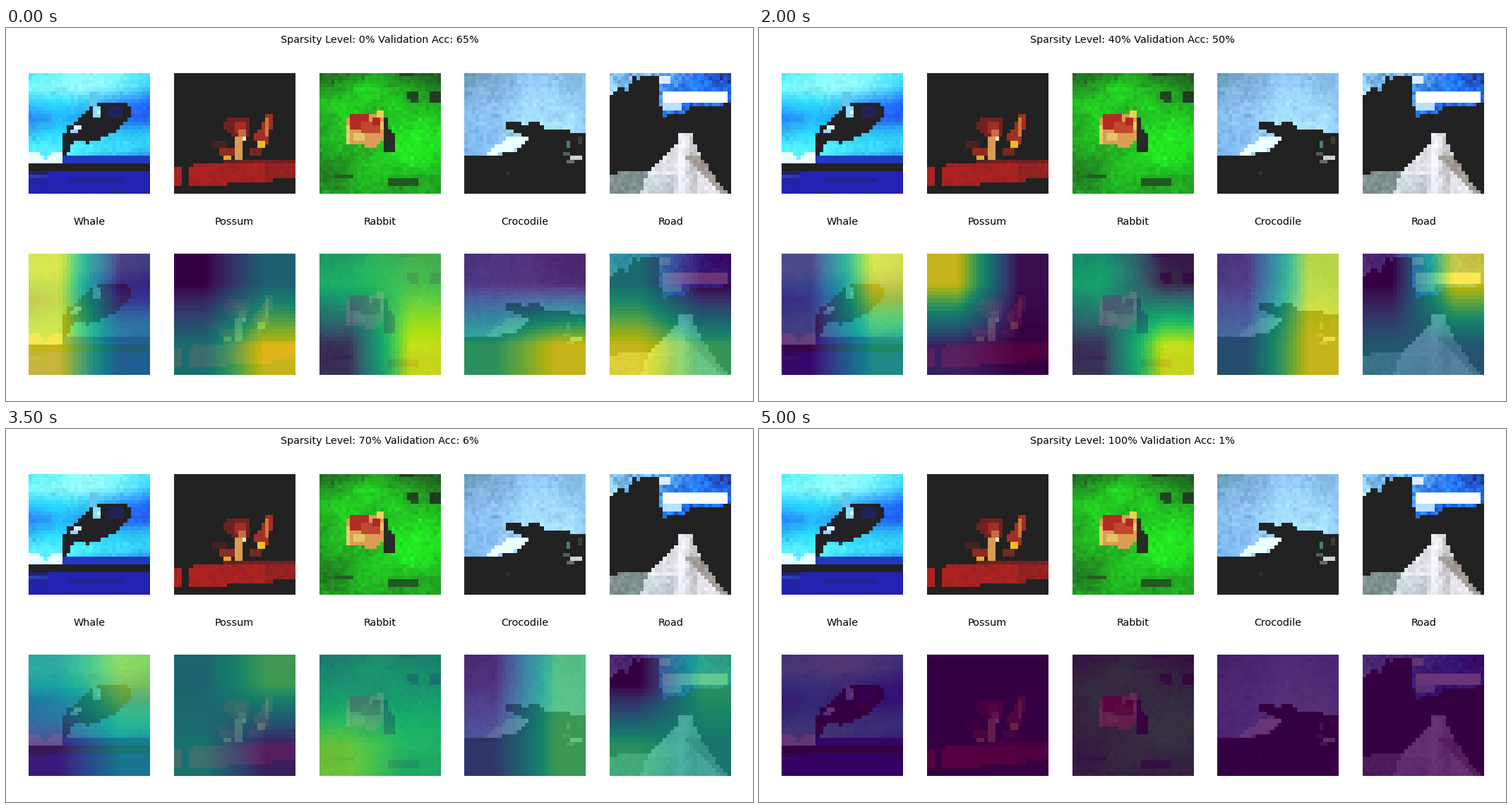
Recreate the animation shown at these times as a matplotlib script. Size 1058 by 529 pixels, loop 5500 ms.

```python
import numpy as np
import matplotlib.pyplot as plt
from matplotlib.animation import FuncAnimation
from matplotlib.colors import to_rgb
from matplotlib.path import Path

WIDTH, HEIGHT, N = 1058, 529, 32
PANEL, PITCH, LEFT = 171.7, 205.82, 32
FLOOR = 34 / 255  # darkest tone shown in the upper row
DARK = "#222222"
ACCURACY = [65, 63, 58, 55, 50, 38, 20, 6, 2, 1, 1]

rng = np.random.default_rng(4)
cols, rows = np.meshgrid(np.arange(N) + 0.5, np.arange(N) + 0.5)
centres = np.column_stack([cols.ravel(), rows.ravel()])


def stretch(grid, edge=0):
    """Bilinear enlargement of a coarse grid to N x N x channels."""
    grid = np.asarray(grid, float)

    def along(values, axis):
        spots = np.linspace(edge, N - edge, values.shape[axis])
        at = np.arange(N) + 0.5
        return np.apply_along_axis(lambda v: np.interp(at, spots, v), axis, values)

    return along(along(grid, 0), 1)


def soft(*lines):
    return stretch([[to_rgb(c) for c in line.split()] for line in lines])


def mottle(img, amount, mask=True):
    grain = rng.normal(0, amount, (N, N, 1)) + stretch(rng.normal(0, amount, (9, 9, 1)))
    img += np.where(np.broadcast_to(mask, (N, N))[..., None], grain * (img > 0.2), 0)


def poly(img, color, *points):
    inside = Path(points).contains_points(centres).reshape(N, N)
    img[inside] = to_rgb(color)
    return inside


def box(img, color, c0, r0, c1, r1):
    img[r0:r1, c0:c1] = to_rgb(color)


def whale():
    img = soft("#58f4ff #70ffff #98ffff #80ffff #48e8ff",
               "#78ffff #90ffff #a0ffff #70f0ff #38c8ff",
               "#30c8ff #28d8ff #40d0f8 #2890ff #2468ff",
               "#2878f0 #24b8ff #28a0f0 #2458f0 #2260f0",
               "#30c0f8 #28d8ff #28d0ff #28c8f8 #2cc0f0",
               "#50f0ff #50f0ff #48f0ff #40e0ff #38d0ff",
               "#70e8ff #60e0ff #30b0ff #2888f8 #2460e8",
               "#2222a0 #2228a8 #2222a8 #2222a0 #2222a0",
               "#2222b0 #2222a8 #2222b0 #2222a8 #2222b0")
    mottle(img, 0.02)
    box(img, "#2238c0", 9, 22, 32, 24)
    box(img, DARK, 0, 24, 32, 26)
    box(img, "#222270", 0, 26, 6, 27)
    box(img, "#2222b4", 5, 26, 32, 31)
    box(img, "#222290", 11, 28, 25, 29)
    poly(img, "#e8ffff", (0, 21), (2, 21), (4, 23), (7, 20.5), (9, 21), (9.5, 24), (0, 24))
    poly(img, "#60c8f0", (16, 5), (17.6, 5.5), (19, 9), (16, 9))
    poly(img, "#222226", (12.4, 13), (16.5, 9), (20, 8), (27.2, 8.6), (27.2, 11.5),
         (25, 14), (21, 16.6), (15.5, 18.6), (12, 18.2), (10, 21.6), (8.6, 21.6),
         (8.6, 17.5), (10.5, 14.5))
    box(img, "#222258", 21, 9, 25, 12)
    box(img, "#8cdcff", 17, 9, 19, 12)
    box(img, "#eaffff", 18, 10, 19, 11)
    box(img, "#e0f4ff", 12, 14, 14, 15)
    box(img, "#a0d0ff", 11, 15, 13, 16)
    return img


def possum():
    img = soft(f"{DARK} {DARK}", f"{DARK} {DARK}")
    red = poly(img, "#aa2222", (0, 25), (10, 24), (16, 23), (32, 23), (32, 28),
               (20, 29), (8, 30), (0, 30))
    img[red & (cols > 24)] = to_rgb("#902222")
    img[red & (rows < 24)] = to_rgb("#702222")
    mottle(img, 0.025, red)
    box(img, DARK, 2, 24, 4, 30)
    box(img, "#482222", 10, 18, 14, 20)
    poly(img, "#702222", (13, 13), (16, 11.5), (19.5, 12), (20, 17), (17, 18), (14, 16))
    box(img, "#a02e24", 16, 13, 19, 16)
    box(img, "#c86a48", 17, 15, 19, 17)
    box(img, "#d89c50", 16, 17, 18, 23)
    box(img, "#f0e4c0", 18, 17, 19, 18)
    box(img, "#8c2c22", 12, 20, 16, 22)
    box(img, "#e8a828", 13, 22, 15, 23)
    poly(img, "#a03024", (24, 11.6), (26, 11), (25, 19), (22, 20.5), (21, 16), (23, 15))
    box(img, "#d07838", 24, 12, 25, 17)
    box(img, "#eebc28", 22, 18, 24, 20)
    box(img, "#702c22", 20, 20, 23, 22)
    return img


def rabbit():
    img = soft("#226022 #227022 #22a022 #229022 #226022 #226022",
               "#229c22 #22b422 #22d422 #22b422 #22a022 #228022",
               "#22b422 #22d822 #22c022 #22c822 #22c022 #22b422",
               "#22a822 #22c822 #22b022 #22d022 #22dc22 #22d022",
               "#229c22 #22c022 #22b822 #22dc22 #22f022 #22dc22",
               "#229022 #22a822 #22c022 #22d822 #22e422 #22c822",
               "#227822 #229022 #22c822 #22c022 #22a822 #22b022",
               "#22a022 #22a022 #22b422 #22a022 #22a822 #22a822")
    mottle(img, 0.035)
    box(img, "#224022", 21, 0, 25, 1)
    box(img, "#224422", 23, 5, 26, 7)
    box(img, "#225022", 24, 7, 26, 8)
    box(img, "#223c22", 29, 5, 32, 8)
    box(img, "#225822", 18, 28, 26, 30)
    box(img, "#226022", 4, 27, 9, 28)
    poly(img, "#262c22", (16, 12), (18, 11.5), (18.5, 15), (20, 16), (20, 21), (17, 21))
    poly(img, "#dc9c54", (7, 14), (8, 11), (10, 10.5), (17, 11), (17, 18), (15, 19.8), (7, 19))
    box(img, "#b42c24", 8, 11, 13, 15)
    box(img, "#c04830", 11, 13, 16, 16)
    box(img, "#b02824", 14, 12, 16, 14)
    box(img, "#e4d060", 7, 14, 8, 19)
    box(img, "#ecd058", 15, 10, 17, 12)
    box(img, "#e0c868", 9, 16, 12, 18)
    box(img, "#e8c860", 16, 13, 17, 15)
    return img


def crocodile():
    img = soft("#6098b0 #78a8d0 #88c0f4 #88c0f0 #80b4dc",
               "#78b0e0 #88bcec #a0dcff #a4dcff #90c8f4",
               "#80b8ec #88c0f4 #a8e0ff #a8e4ff #98d0fc",
               "#80b8f0 #88c4f8 #98d4ff #98d0ff #90c8ff",
               "#88c0f0 #90ccff #a0dcff #88c0f0 #88c0f0")
    mottle(img, 0.025)
    poly(img, "#ecffff", (9, 19), (12, 17), (17, 16.5), (16, 19), (12, 21), (6, 22), (7, 20))
    poly(img, DARK, (10.6, 13), (14, 13), (16, 14), (19, 13), (21, 14.5), (27, 15),
         (28, 16), (32, 16), (32, 32), (0, 32), (0, 21.5), (8, 22), (13, 21), (16, 19),
         (17, 17), (13, 16), (13, 15), (10.6, 14.4))
    box(img, "#488070", 27, 18, 28, 20)
    box(img, "#506050", 26, 21, 28, 22)
    box(img, "#c8d8c8", 28, 22, 31, 23)
    box(img, "#384038", 30, 17, 31, 19)
    box(img, "#607060", 27, 23, 29, 24)
    box(img, "#223a22", 11, 26, 12, 27)
    return img


def road():
    img = soft("#90d0f8 #60a8f0 #70b8f8 #2270f0 #2248a0",
               "#b0e4ff #78c0f8 #2278f8 #2270f0 #2260f0",
               "#80c0f0 #a0d8ff #3080f8 #2278ff #2278ff",
               "#2270f0 #a0d8ff #70b8f8 #2274ff #2274ff",
               "#2270f0 #2270f0 #2270f0 #2270f0 #2270f0")
    mottle(img, 0.07)
    box(img, "#d8f0ff", 13, 1, 16, 3)
    box(img, "#b8e0ff", 14, 8, 19, 10)
    poly(img, DARK, (0, 6), (2, 5), (2, 3.5), (5, 5), (6, 1), (8, 2), (9, 0.8), (12, 0.8),
         (13, 2), (13, 7), (14.5, 11.6), (20, 11), (22, 9), (28, 9), (32, 8), (32, 32), (0, 32))
    box(img, "#ffffff", 14, 5, 31, 8)
    way = poly(img, "#e4e4ec", (18.6, 16), (21.4, 16), (24, 22), (28, 28), (31.5, 32),
               (0, 32), (0, 27), (4, 26), (10, 26), (14, 22.5), (18, 18))
    verge = way & (cols < 10 - (rows - 27) * 0.4)
    img[verge] = to_rgb("#7c8c8c")
    img[way & (cols > 21) & (cols < 23)] = to_rgb("#d0d0d4")
    img[way & (cols > 18) & (cols < 20)] = to_rgb("#f4f4fc")
    img[way & ~verge & (cols < 17) & (rows > 27)] = to_rgb("#ccd4dc")
    img[way & (cols > rows - 2.4) & (rows > 22)] = to_rgb("#a8a09c")
    mottle(img, 0.03, way)
    return img


# Percent heat at top left, top right, bottom left, bottom right
HEAT_STEPS = [0, 1, 2, 4, 6, 8, 10]
COLD = (0, 0, 0, 0)
SCENES = {
    "Whale": (whale, [(100, 5, 100, 40), (50, 5, 90, 100), (12, 100, 40, 0),
                      (8, 100, 3, 63), (100, 70, 0, 20), (6, 100, 17, 84), COLD]),
    "Possum": (possum, [(0, 41, 48, 100), (70, 96, 0, 100), (0, 100, 43, 20),
                        (100, 5, 12, 0), (80, 45, 100, 0), (7, 100, 0, 22), COLD]),
    "Rabbit": (rabbit, [(62, 74, 7, 100), (63, 0, 100, 54), (83, 40, 97, 2),
                        (54, 2, 8, 100), (6, 98, 68, 82), (85, 0, 96, 43), COLD]),
    "Crocodile": (crocodile, [(7, 0, 67, 100), (56, 88, 100, 0), (100, 32, 0, 46),
                              (8, 92, 32, 100), (3, 43, 32, 100), (5, 100, 10, 43), COLD]),
    "Road": (road, [(47, 0, 100, 71), (7, 100, 48, 0), (88, 82, 0, 100),
                    (0, 100, 37, 34), (0, 36, 100, 34), (0, 100, 34, 70), COLD]),
}

fig = plt.figure(figsize=(WIDTH / 100, HEIGHT / 100), dpi=100, facecolor="white")


def panel(left, top, img):
    ax = fig.add_axes([left / WIDTH, 1 - (top + PANEL) / HEIGHT,
                       PANEL / WIDTH, PANEL / HEIGHT])
    ax.axis("off")
    return ax.imshow(img, interpolation="nearest", aspect="auto")


def caption(x, baseline, text):
    return fig.text(x / WIDTH, 1 - baseline / HEIGHT, text, ha="center", va="baseline",
                    family="DejaVu Sans", size=10.4, color="black")


title = caption(WIDTH / 2, 21, "")
overlays = []
for i, (name, (paint, heat)) in enumerate(SCENES.items()):
    left = LEFT + i * PITCH
    photo = np.clip(paint(), FLOOR, 1)
    panel(left, 63.8, photo)
    caption(left + PANEL / 2, 279, name)
    light = (photo - FLOOR) / (1 - FLOOR)
    overlays.append((panel(left, 320.2, photo), light, np.array(heat) / 100))


def draw(step):
    title.set_text(f"Sparsity Level: {step * 10}% Validation Acc: {ACCURACY[step]}%")
    for image, light, heat in overlays:
        corners = [np.interp(step, HEAT_STEPS, heat[:, k]) for k in range(4)]
        glow = plt.cm.viridis(stretch(np.reshape(corners, (2, 2)), edge=N / 4))[..., :3]
        image.set_data(np.clip(0.78 * glow + 0.21 * light, 0, 1))
    return [title] + [image for image, _, _ in overlays]


anim = FuncAnimation(fig, draw, frames=11, interval=500, repeat=True, repeat_delay=0)
plt.show()
```
